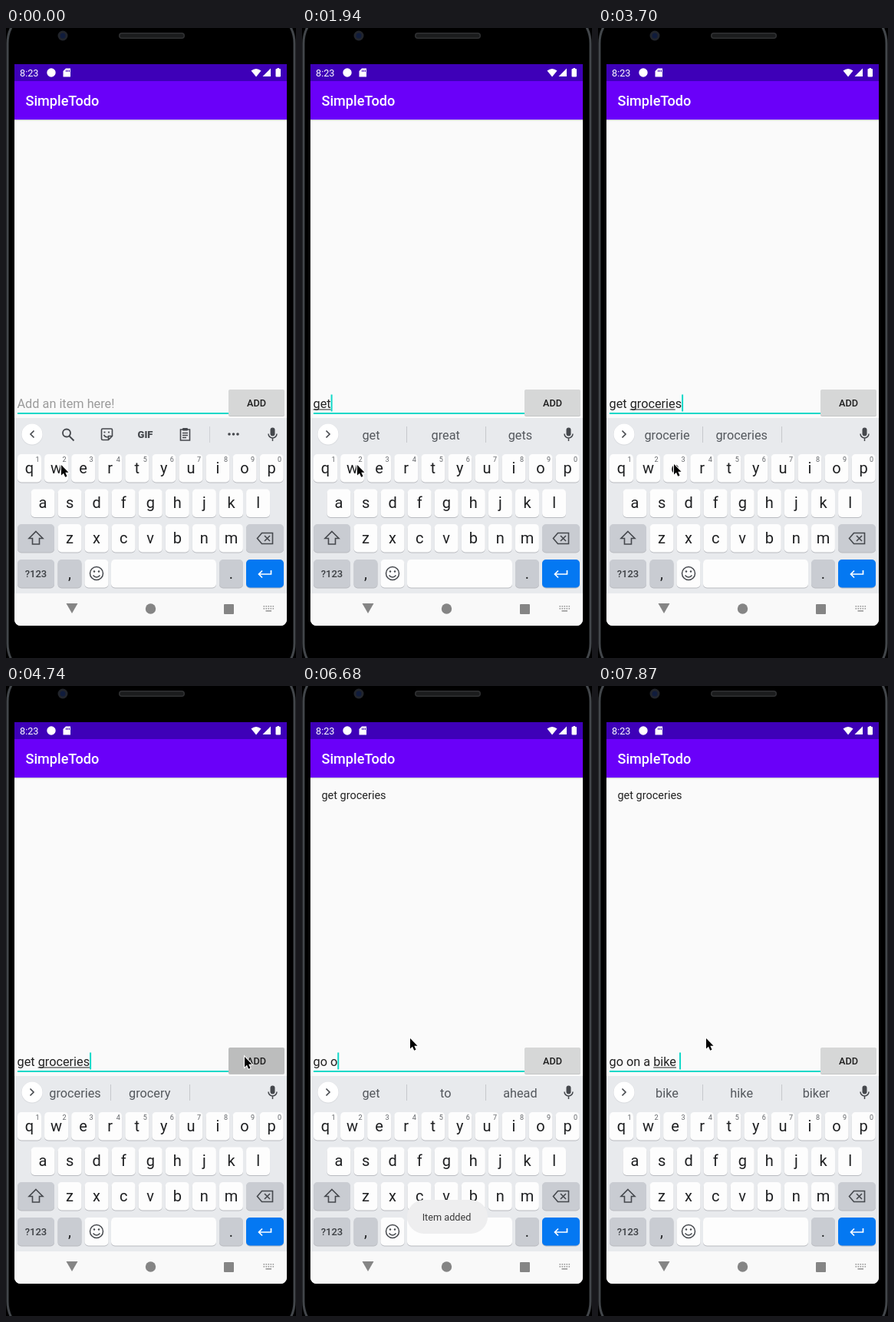
Write an HTML page with a canvas that moves like this. It is 378x819 px and loops after 8000 ms.

```html
<!DOCTYPE html>
<html lang="en">
<head>
<meta charset="utf-8">
<title>To-do app</title>
<style>
html, body { margin: 0; height: 100%; overflow: hidden; background: #000; }
canvas { display: block; }
</style>
</head>
<body>
<canvas id="stage" width="378" height="819"></canvas>
<script>
const ctx = document.getElementById('stage').getContext('2d');
const LOOP = 8000;
const PURPLE = '#6a00f9', TEAL = '#0fd8c8', ICON = '#45484d';

// Each track holds [start time, value]; values switch without easing.
// Brackets mark the underlined part of the word being typed.
const typed = [
  [0, ''], [750, 'g'], [900, '[g]'], [1200, '[g]e'], [1500, '[ge]'], [1650, '[ge]t'],
  [1800, '[get]'], [1950, 'get '], [2230, 'get g'], [2370, 'get [g]r'], [2520, 'get [gr]'],
  [2670, 'get [gr]o'], [2810, 'get [gro]'], [3110, 'get [gro]c'], [3250, 'get [groc]e'],
  [3400, 'get [groce]r'], [3550, 'get [grocer]ie'], [3700, 'get [grocerie]s'],
  [3850, 'get [groceries]'], [4890, ''], [6390, 'g'], [6530, 'go '], [6680, 'go o'],
  [6830, 'go [o]n'], [6970, 'go on '], [7120, 'go on a'], [7270, 'go on a '],
  [7420, 'go on a b'], [7570, 'go on a [b]i'], [7720, 'go on a [bik]e'], [7870, 'go on a [bike] ']
];
const suggested = [
  [0, ''], [900, 'g|go|get'], [1500, 'ge|get|he'], [1800, 'get|great|gets'],
  [2080, 'a|the|it'], [2370, 'g|go|get'], [2520, 'gr|groceries|GR'],
  [2810, 'gro|groceries|grow'], [3250, 'groc|groceries|grocery'], [3550, 'grocer|groceries|grocery'],
  [3700, 'grocerie|groceries|'], [3850, 'groceries|grocery|'], [4890, ''], [6530, 'g|go|get'],
  [6680, 'get|to|ahead'], [6830, 'o|on|to'], [6970, 'on|in|one'], [7120, 'the|a|my'],
  [7270, 'a|an|at'], [7420, 'few|little|walk'], [7570, 'b|but|be'],
  [7720, 'bi|bike|big'], [7870, 'bike|hike|biker']
];
const caret = [[0, 0], [150, 1], [4300, 0], [4740, 1], [5640, 0], [6090, 1]];
const pointer = [
  [0, [71, 567]], [3550, [82, 567]], [3700, [98, 566]], [3850, [160, 545]], [4000, [235, 505]],
  [4150, [290, 468]], [4300, [308, 475]], [4450, [310, 481]], [5040, [270, 470]],
  [5190, [190, 445]], [5340, [133, 436]], [5490, [138, 449]], [5640, [140, 457]]
];
const toast = [
  [0, 0], [5190, .4], [5340, .8], [5490, 1], [7420, .8], [7570, .5], [7720, .2], [7870, 0]
];

const at = (track, t) => track.findLast(([start]) => start <= t)[1];

function box(x, y, w, h, color, r = 0) {
  ctx.fillStyle = color;
  ctx.beginPath();
  ctx.roundRect(x, y, w, h, r);
  ctx.fill();
}

function disc(x, y, r, color) {
  box(x - r, y - r, 2 * r, 2 * r, color, r);
}

function text(s, x, y, size, color, align = 'left', weight = 400) {
  ctx.font = `${weight} ${size}px Roboto, sans-serif`;
  ctx.textAlign = align;
  ctx.fillStyle = color;
  ctx.fillText(s, x, y);
}

function fill(d, color) {
  ctx.fillStyle = color;
  ctx.fill(new Path2D(d));
}

function line(d, color = ICON, width = 1.6) {
  ctx.strokeStyle = color;
  ctx.lineWidth = width;
  ctx.stroke(new Path2D(d));
}

function drawPhone() {
  box(0, 0, 378, 819, '#000');
  ctx.strokeStyle = '#42464a';
  ctx.lineWidth = 3;
  ctx.beginPath();
  ctx.roundRect(2, -25, 374, 870, 45);
  ctx.stroke();
  disc(74, 10, 6.5, '#22252c');
  disc(74, 10, 3.5, '#101c3c');
  box(147, 6, 86, 8, '#303133', 4);
  box(148.5, 7.5, 83, 5, '#1b1c1d', 2.5);
}

function drawAppBar() {
  box(11, 47, 355, 730, '#fafafa', [0, 0, 8, 8]);
  box(11, 119, 355, 1, '#d2d0d6');
  box(11, 120, 355, 1, '#ececee');
  box(11, 47, 355, 22, '#3e00b8');
  box(11, 69, 355, 50, PURPLE);
  text('8:23', 18, 62.5, 12.7, '#fff');
  disc(59, 58, 5.7, '#fff');
  fill('M78 52.5h6v11h-9.500v-7.500z', '#fff');
  line('M78.500 54.500v2.500m2-2.500v2.500m2-2.500v2.500', '#3e00b8', 1);
  fill('M319.500 55.500Q326 50.500 332.500 55.500L326 63.500z', '#fff');
  fill('M345 52.500v10.500h-10.500z', '#fff');
  box(351.500, 53, 6.500, 10.500, '#fff', 1);
  box(353.500, 52, 2.500, 2, '#fff');
  text('SimpleTodo', 25.5, 101, 18.1, '#fff', 'left', 500);
}

function drawField(t) {
  const marked = at(typed, t);
  const plain = marked.replace(/[[\]]/g, '');
  const left = 14.5;
  text(plain || 'Add an item here!', left, 494, 16.3, plain ? '#222' : '#9b9b9b');
  const widthOf = s => ctx.measureText(s).width;
  const open = marked.indexOf('[');
  if (open >= 0) {
    const start = widthOf(plain.slice(0, open));
    const end = widthOf(plain.slice(0, marked.indexOf(']') - 1));
    box(left + start, 495.5, end - start, 1, '#222');
  }
  box(15, 500, 275, 2, TEAL);
  if (at(caret, t)) box(left + (plain && widthOf(plain)), 476.5, 2, 22, TEAL);

  const pressed = t >= 4740 && t < 5040;
  box(290, 471, 73, 34, '#c4c5c5', 2);
  box(290, 470, 73, 34, pressed ? '#bcbdbd' : '#d6d7d7', 2);
  text('ADD', 326.5, 491.5, 12.7, '#202020', 'center', 500);
}

function drawStrip(words) {
  disc(34, 528.5, 14, '#d9dbdf');
  disc(34, 528, 13.5, '#fff');
  line(words ? 'M31.500 523.500l4.500 4.500-4.500 4.500' : 'M36.500 523.500l-4.500 4.500 4.500 4.500');
  box(344.500, 519.500, 6, 11, ICON, 3);
  line('M342 527.500a5.500 5.500 0 0 0 11 0M347.500 533v4', ICON, 1.5);
  if (words) {
    words.split('|').forEach((word, i) => text(word, 90 + i * 97.2, 534.5, 16.3, '#54585d', 'center'));
    box(136, 518, 1, 21, '#c6c8cc');
    box(239, 518, 1, 21, '#c6c8cc');
    return;
  }
  line('M84 526.500a5 5 0 1 0-10 0a5 5 0 1 0 10 0M82.500 530.500l6 6', ICON, 1.8);
  line('M126 521h11q1.500 0 1.500 1.500v8l-5 5h-7.500q-1.500 0-1.500-1.500v-11.500q0-1.500 1.500-1.500M138.500 530.500h-5v5M127.500 529q2 3.500 5 2.500');
  disc(128.500, 525.500, 1.1, ICON);
  disc(134, 525.500, 1.1, ICON);
  text('GIF', 181.5, 532.5, 13, ICON, 'center', 900);
  line('M227.500 522h12v14h-12zM230 526.500h7m-7 3h7m-7 3h5');
  box(230, 520, 7, 3.500, ICON, 1);
  box(265, 518, 1, 21, '#cfd1d5');
  for (const x of [291, 296.500, 302]) disc(x, 528, 1.8, ICON);
}

function drawKey(x, y, w, label = '', color = '#fdfdfd') {
  box(x, y + 1, w, 36.500, '#b9bbc0', 5);
  box(x, y, w, 36.500, color, 5);
  text(label, x + w / 2, y + 24.5, 20, '#1f2022', 'center');
}

function drawKeyboard(t) {
  const gray = '#c9ccd2';
  box(11, 507, 355, 228, '#e8eaed');
  drawStrip(at(suggested, t));
  [['qwertyuiop', 15, 554], ['asdfghjkl', 32.500, 599.500], ['zxcvbnm', 67.500, 645]].forEach(([keys, x, y], row) => {
    [...keys].forEach((key, i) => {
      drawKey(x + i * 35.07, y, 31, key);
      if (!row) text((i + 1) % 10, x + i * 35.07 + 26, 563.5, 9, '#606367', 'center');
    });
  });
  drawKey(15, 645, 48, '', gray);
  line('M39 654.500l9 9h-4.500v7.500h-9v-7.500h-4.500z');
  drawKey(313, 645, 49, '', gray);
  line('M333.500 656.500h14v14h-14l-6-7zM337 660l7 7m0-7l-7 7');

  drawKey(15, 691, 48, '', gray);
  text('?123', 39, 714, 13, '#3c3f43', 'center', 500);
  drawKey(67.500, 691, 31, ',', gray);
  drawKey(102.500, 691, 31);
  line('M126.500 709a8.500 8.500 0 1 0-17 0a8.500 8.500 0 1 0 17 0M113.500 711.500q4.500 5 9 0', ICON, 1.5);
  disc(115, 706.500, 1.2, ICON);
  disc(121, 706.500, 1.2, ICON);
  drawKey(137, 691, 137);
  drawKey(278, 691, 31, '.', gray);
  drawKey(313, 691, 49, '', '#0478f2');
  line('M345.500 705v5h-15.500M334 705.500l-4.500 4.500 4.500 4.500', '#fff', 1.7);

  box(11, 735, 355, 42, '#f9f9f9', [0, 0, 8, 8]);
  fill('M78.500 748h15l-7.500 13z', '#858585');
  disc(188.500, 755, 6.7, '#858585');
  box(284, 749, 13, 13, '#858585', 1);
  for (let i = 0; i < 10; i++) box(335.500 + i % 5 * 3, 751 + Math.floor(i / 5) * 3, 1.600, 1.600, '#999');
  box(338.500, 757, 7.500, 1.600, '#999');
}

function drawToast(alpha) {
  ctx.globalAlpha = alpha;
  box(137, 668, 105, 44, '#eeeeef', 22);
  text('Item added', 188.5, 694.5, 12.7, '#3a3a3a', 'center');
  ctx.globalAlpha = 1;
}

function drawPointer([x, y]) {
  ctx.save();
  ctx.translate(x, y);
  const arrow = 'M1 1v13.500l3-2.800 2.200 5 2.300-1-2.200-4.900h4.200z';
  line(arrow, '#fff', 2);
  fill(arrow, '#000');
  ctx.restore();
}

function frame() {
  const t = performance.now() % LOOP;
  drawPhone();
  drawAppBar();
  if (t >= 4890) text('get groceries', 25.5, 147, 14.48, '#222');
  drawField(t);
  drawKeyboard(t);
  drawToast(at(toast, t));
  drawPointer(at(pointer, t));
  requestAnimationFrame(frame);
}
frame();
</script>
</body>
</html>
```
